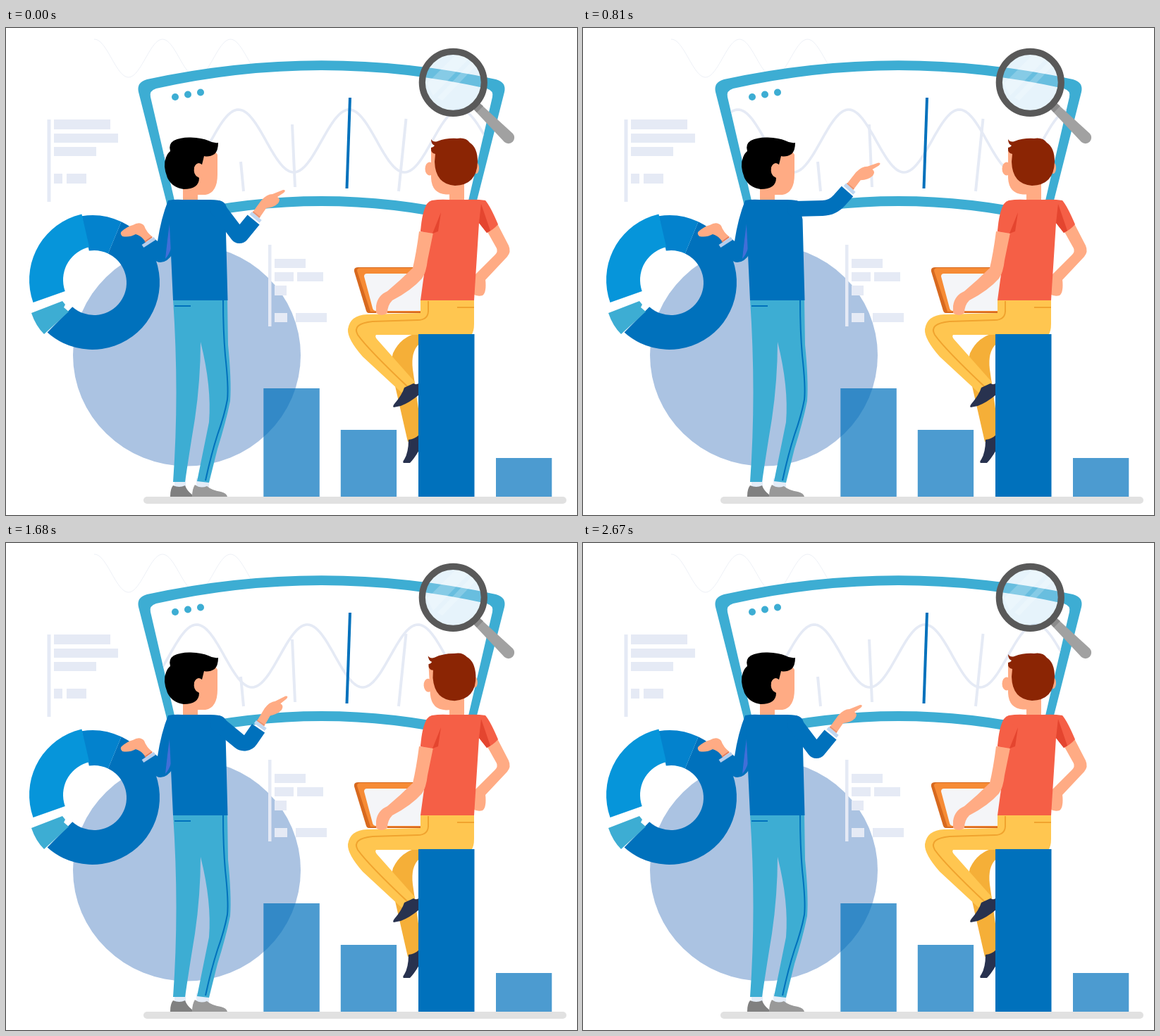
These frames come from a looping animation (810x692 px, 2700 ms). An HTML page with a canvas:

```html
<!DOCTYPE html>
<html lang="en">
<head>
<meta charset="utf-8">
<title>Data analysis</title>
<style>
html, body { margin: 0; width: 100%; height: 100%; overflow: hidden; background: #fff; }
canvas { display: block; width: 810px; height: 692px; }
</style>
</head>
<body>
<canvas id="stage" width="810" height="692"></canvas>
<script>
const ctx = document.getElementById('stage').getContext('2d');
const LOOP = 2700;
const BLUE = '#0071bc', TEAL = '#3dadd3', PALE = '#e5eaf5', SKIN = '#ffab84',
      RED = '#f55f46', YELLOW = '#ffc650', NAVY = '#28324f';

const rad = deg => deg * Math.PI / 180;
const fill = (d, color) => { ctx.fillStyle = color; ctx.fill(new Path2D(d)); };
const line = (d, color, width, cap = 'butt') => {
  ctx.strokeStyle = color;
  ctx.lineWidth = width;
  ctx.lineCap = cap;
  ctx.lineJoin = 'round';
  ctx.stroke(new Path2D(d));
};
const rects = (color, list) => {
  ctx.fillStyle = color;
  for (const r of list) ctx.fillRect(...r);
};
const disc = (x, y, rx, color, ry = rx) => {
  ctx.fillStyle = color;
  ctx.beginPath();
  ctx.ellipse(x, y, rx, ry, 0, 0, Math.PI * 2);
  ctx.fill();
};
// ring section between two circles given as [x, y, radius]
const section = (outer, inner, from, to, color) => {
  ctx.fillStyle = color;
  ctx.beginPath();
  ctx.arc(...outer, rad(from), rad(to));
  ctx.arc(...inner, rad(to), rad(from), true);
  ctx.fill();
};
const group = draw => { ctx.save(); draw(); ctx.restore(); };
const ease = (t, start, length) => {
  const k = Math.min(1, Math.max(0, (t - start) / length));
  return (1 - Math.cos(k * Math.PI)) / 2;
};
function wave(x0, x1, peak, period, mid, amp) {
  let d = '';
  for (let x = x0; x <= x1; x += 2)
    d += (d ? 'L' : 'M') + x + ' ' + (mid - amp * Math.cos((x - peak) / period * Math.PI * 2)).toFixed(2);
  return d;
}

function backdrop() {
  line(wave(125, 347, 222, 96.5, 43, 27), '#eef1f7', 1);
  disc(256.5, 465, 161.5, '#abc3e2', 157.5);
  rects(PALE, [
    [58.5, 130, 5, 117], [68, 130, 80, 14], [68, 150, 91, 13], [68, 169, 60, 13],
    [68, 207, 12, 14], [86, 207, 28, 14],
    [372, 308, 4.5, 116], [381, 328, 44, 13], [381, 347, 27, 13], [413, 347, 37, 13],
    [381, 366, 17, 14], [381, 405, 18, 13], [411, 405, 44, 13]
  ]);
  line('M200 671H790', '#e1e1e1', 10, 'round');
  rects('rgba(0,113,188,.7)', [[365.3, 512, 79.5, 154], [474.8, 571, 79.3, 95], [695, 611, 79.3, 55]]);
}

const SCREEN_OUTER = 'M200 73Q447.5 19.5 695 73Q710 77 707 91L668 245L664 265Q660 280 648 276Q447.5 230 247 276Q235 280 231 265L227 245L188 91Q185 77 200 73Z';
const SCREEN_INNER = 'M213 86Q447.5 34 682 86Q692 89 690 98L656 245L652 262Q447.5 216 243 262L239 245L205 98Q203 89 213 86Z';

function screen(t) {
  fill(SCREEN_OUTER, TEAL);
  fill(SCREEN_INNER, '#fff');
  group(() => {
    ctx.clip(new Path2D(SCREEN_INNER));
    line(wave(180, 710, 329.7 + 157 * t / LOOP, 157, 160.5, 44.5), PALE, 3.6);
    line('M333 190L337 232M406 137L410 226M567.5 129L557 232', PALE, 4);
    line('M488 99L483.5 228', BLUE, 4);
  });
  disc(240, 98, 5, TEAL);
  disc(258, 94.5, 5, TEAL);
  disc(276, 91.5, 5, TEAL);
}

function magnifier() {
  fill('M662 114L671 106L719 150A8.5 8.5 0 0 1 707 162Z', '#a1a1a1');
  fill('M662 114L671 106L677 111L668 120Z', '#8b8b8b');
  group(() => {
    ctx.beginPath();
    ctx.arc(634.3, 77.3, 42, 0, Math.PI * 2);
    ctx.clip();
    rects('rgba(184,221,243,.35)', [[590, 33, 90, 90]]);
    fill('M640 36L658 42L606 96L597 79ZM663 45L669 51L619 103L612 99Z', 'rgba(255,255,255,.2)');
  });
  ctx.strokeStyle = '#595959';
  ctx.lineWidth = 9.2;
  ctx.beginPath();
  ctx.arc(634.3, 77.3, 44, 0, Math.PI * 2);
  ctx.stroke();
}

function donut() {
  const rim = [122.5, 361.5, 95.5], hole = [125, 362, 46];
  section(rim, hole, -64.5, 132, BLUE);
  section(rim, hole, -99, -64.5, '#0382cd');
  section([129, 358, 96], [129, 358, 48], 160.5, 257, '#0695da');
  fill('M36 405L80 388L84 393L82 397L89 403L54 435Q42 423 36 405Z', TEAL);
}

function standingMan(t) {
  // shoes, socks, trousers
  fill('M239 640H255V653H239ZM270 640H288V654H270Z', '#e3ecf7');
  fill('M233 665Q233 655 237 650Q246 654 254 650Q257 658 264 663V666H233Z', '#808080');
  fill('M264 666Q264 655 268 649Q276 655 285 651Q292 657 305 659Q313 661 314 666Z', '#999');
  fill('M237 386H314L315 450Q320 500 318 530Q312 560 300 598L288 646L271 644Q280 600 288 560Q292 510 276 446Q276 500 268 555Q259 610 254 645H237Q246 520 237 386Z', TEAL);
  line('M308 387Q308 430 311 465Q316 510 314 528Q310 550 300 578Q291 606 283 643M239 395H262', BLUE, 2);

  // arm resting on the chart
  fill('M230 245L245 245L237 320Q229 333 219 333Q213 333 209 327L195 309L209 298L215 303Q220 270 230 245Z', BLUE);
  fill('M232.5 274L234.5 312Q231 323 226 328Q229 300 232.5 274Z', '#416fd8');
  fill('M164 289Q172 282 180 280Q190 274 196 281Q199 290 208 297L198 304Q192 295 184 293Q175 298 165 296Q161 292 164 289Z', SKIN);
  line('M197 304L207 297', '#e47d5d', 2);
  line('M194 310L211 299', '#b5cdec', 5);

  // torso and head
  fill('M230 245Q240 243 251 244H290Q303 244 306 247L311.5 272L314.5 387H237L233 300Z', BLUE);
  fill('M251 222H272V237H283Q300 234 300 208V180L290 165L262 190Z', SKIN);
  rects(SKIN, [[251, 222, 21, 22]]);
  fill('M233 175Q230 165 238 160Q248 155 262 155.5Q278 156 287 160Q294 164 301 163Q301 174 296 179Q288 184 281 182L278 194Q270 190 267 198Q265 208 274 213Q274 229 252 229Q236 227 229 213Q222 195 227 184Q229 178 233 175Z', '#000');
  disc(273.5, 202, 6.5, SKIN, 10);

  pointingArm(t);
}

function pointingArm(t) {
  const raise = ease(t, 0, 520) - ease(t, 1333, 520);
  const upper = rad(53 - 54.5 * raise), reach = 50 + 3 * raise;
  const ex = 301 + reach * Math.cos(upper), ey = 257 + reach * Math.sin(upper);
  const bend = rad(2.5 * raise - 7.5 * Math.sin(Math.PI * raise));
  const cuffX = ex + 20 * Math.cos(bend) + 24.5 * Math.sin(bend);
  const cuffY = ey + 20 * Math.sin(bend) - 24.5 * Math.cos(bend);
  // forearm is drawn around the elbow at (331, 297)
  group(() => {
    ctx.translate(ex, ey);
    ctx.rotate(bend);
    ctx.translate(-331, -297);
    fill('M349 263L362 245Q370 236 378 236L393 230Q398 230 394 234L385 240Q390 243 386 249Q380 255 369 256L358 272Z', SKIN);
    line('M350 261L360 269', '#e9916f', 1.5);
    line('M347 263L361 275', '#c0d7f1', 5);
  });
  const sleeve = new Path2D();
  sleeve.moveTo(301, 257);
  sleeve.arcTo(ex, ey, cuffX, cuffY, 3 + 30 * raise);
  sleeve.lineTo(cuffX, cuffY);
  line(sleeve, BLUE, 22);
  disc(301, 257, 12, BLUE);
}

function laptop() {
  fill('M499 340H592V405H514Q512 405 511 402L494 346Q493 340 499 340Z', '#d7691f');
  fill('M502 341H592V403H517L498 345Q498 341 502 341Z', '#f68b35');
  fill('M512 349H592V402H525Q521 402 520 398L508 353Q508 349 512 349Z', '#f4f5f8');
}

function seatedMan(t) {
  laptop();
  fill('M586 433Q560 438 549 462Q545 475 550 500L570 588L586 581V548L577 485Q574 460 586 449Z', '#f5af38');
  fill('M571 585Q580 584 586 578V600Q579 612 573 618H564Q562 617 565 613Q571 603 571 585Z', NAVY);
  fill('M588 386H664V420Q664 432 660 436H525Q523 438 526 442L580 503Q574 514 561 518L506 467Q484 442 485 428Q488 408 512 407L588 405Z', YELLOW);
  line('M599 388V403Q598 415 584 415L520 417Q490 420 499 436Q513 456 570 510M640 397H664', '#f0a32e', 2);
  fill('M578 505Q583 508 586 504V521Q573 532 560 537L550 539Q548 538 551 534Q562 521 565 511Z', NAVY);
  rects(BLUE, [[585, 435, 79.5, 231]]);

  fill('M682 288L697 278L713 309Q717 318 711 325L680 358L664 352L694 322Q698 318 696 313Z', SKIN);
  fill('M664 351L680 357Q682 376 676 380Q669 382 662 378V362Z', SKIN);
  rects(SKIN, [[629, 218, 21, 28]]);
  fill('M604 245Q616 243 628 244H652Q668 243 680 245Q687 253 698 279Q691 287 682 291L671 277L664 387H588L601 291L588 289Q590 262 597 250Q600 246 604 245Z', RED);
  fill('M586 289Q582 320 577 341Q560 358 541 374Q527 380 525 395V405Q533 411 541 405Q541 394 548 387Q575 373 590 356Q596 348 598 330L606 291Z', SKIN);
  fill('M597 250L588 289L606 292L617 262Z', RED);
  fill('M617 262L613 289L605 292Z', '#e4452f');
  fill('M674 250L687 288L682 291L671 277Z', '#e4452f');

  // head leans toward the screen and back
  const lean = ease(t, 1200, 500) - ease(t, 1700, 500);
  group(() => {
    ctx.translate(640, 236);
    ctx.rotate(rad(-3.2 * lean));
    ctx.translate(-640, -236);
    fill('M603 174V213Q604 235 624 236.5H650V200Z', SKIN);
    disc(601, 200, 6.5, SKIN, 9.5);
    disc(667, 199, 4, SKIN, 8);
    fill('M603 158Q606 163 612 161Q625 156 640 157Q652 155 658 163Q669 170 669 190Q668 223 637 224Q609 222 608 190L609 179Q602 178 603 170Q606 170 608 167Q603 165 603 158Z', '#8b2504');
  });
}

function render(now) {
  const t = now % LOOP;
  ctx.fillStyle = '#fff';
  ctx.fillRect(0, 0, 810, 692);
  backdrop();
  screen(t);
  magnifier();
  donut();
  standingMan(t);
  seatedMan(t);
  requestAnimationFrame(render);
}
render(0);
</script>
</body>
</html>
```
